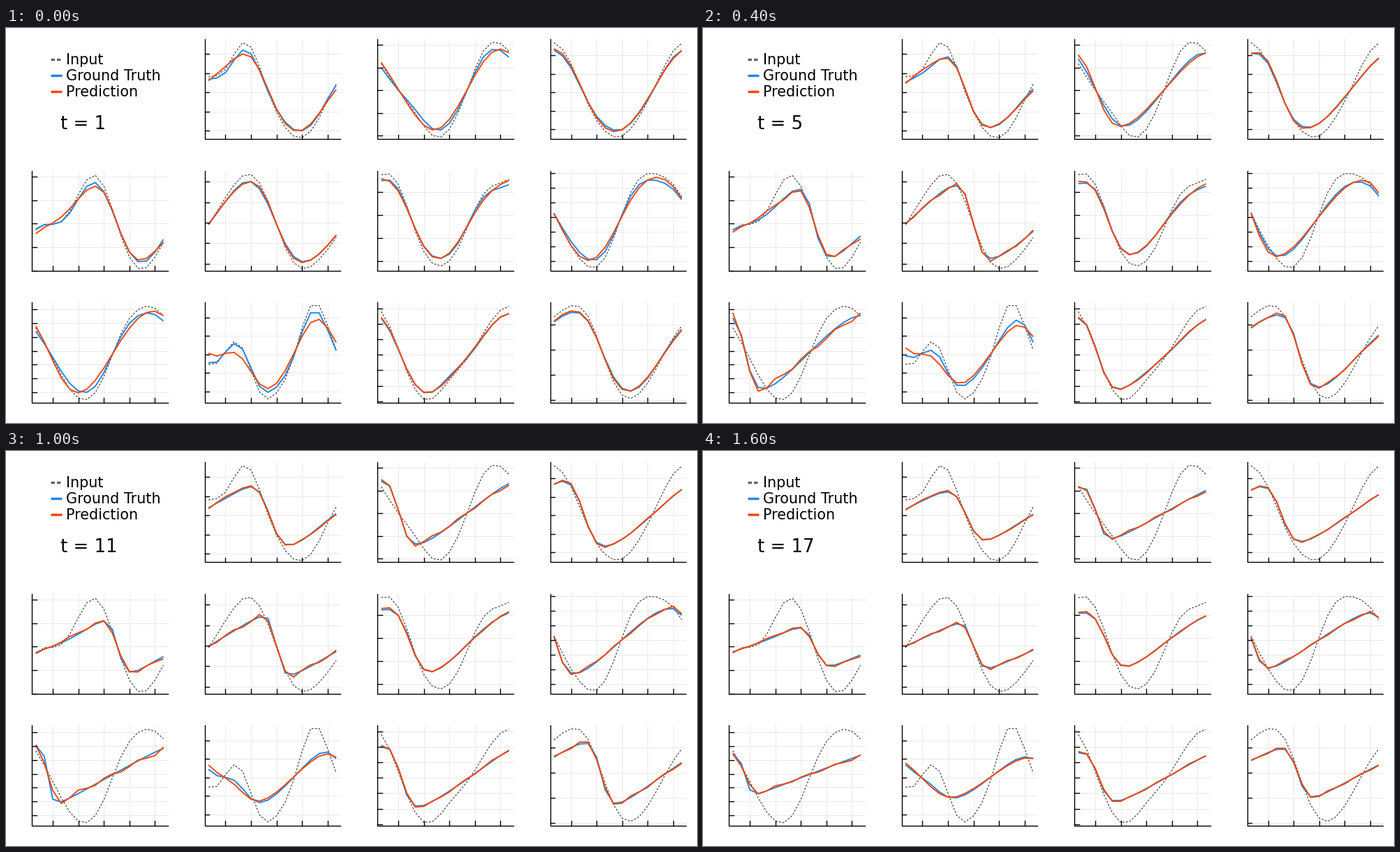
A matplotlib script that plays this animation: 990x566 px, repeating every 2.1 s.

```python
import numpy as np
import matplotlib.pyplot as plt
from matplotlib.animation import FuncAnimation

W, H, DPI = 990, 566, 100
PX = 72 / DPI                      # points per pixel
BLUE, ORANGE, GRAY = "#1c86ee", "#ff4500", "#4d4d4d"
LAST, HOLD = 17, 4                 # final time step, extra frames it stays

POINTS, FINE = 16, 64              # plotted samples, solver cells per period
SUBSTEPS = 20                      # solver steps per time step
SPEED = 0.105                      # samples per step travelled at value 1
VISCOSITY = 0.14
GAIN = 0.85                        # truth amplitude relative to the input
BLUR, MODES = 0.12, 4              # smoothing and bandwidth of the prediction

# Per panel: row, column, y of zero, pixels per tick, value per tick,
# and the input's height above zero at every second sample.
PANELS = [
    (0, 1, 92, 27.5, 1, [22, 33, 71, 36, -29, -63, -56, -11]),
    (0, 2, 89, 32.5, 2, [38, 0, -33, -65, -56, -3, 56, 67]),
    (0, 3, 92, 26.5, 1, [71, 41, -17, -56, -63, -35, 12, 59]),
    (1, 0, 280.4, 33.7, 2, [-9, -1, 18, 63, 54, -17, -64, -48]),
    (1, 1, 279, 29.4, 2, [-3, 36, 67, 57, -3, -57, -63, -38]),
    (1, 2, 268, 33.2, 1, [58, 44, -23, -69, -66, -21, 30, 46]),
    (1, 3, 271, 21, 1, [6, -41, -71, -58, 4, 55, 62, 47]),
    (2, 0, 462.5, 19.8, 2, [33, -11, -55, -70, -37, 24, 59, 61]),
    (2, 1, 467.7, 26.6, 1, [-14, 4, 9, -54, -55, -4, 70, 41]),
    (2, 2, 468.3, 22.1, 1, [62, 9, -50, -63, -36, -7, 31, 64]),
    (2, 3, 461, 36, 2, [47, 63, 48, -15, -65, -63, -27, 17]),
]

plt.rcParams["font.family"] = "DejaVu Sans"
fig = plt.figure(figsize=(W / DPI, H / DPI), dpi=DPI, facecolor="white")
ax = fig.add_axes([0, 0, 1, 1])
ax.set(xlim=(0, W), ylim=(H, 0))
ax.axis("off")


def stroke(x, y, color, width, z, **kw):
    return ax.plot(x, y, color=color, lw=width * PX, zorder=z, **kw)[0]


def label(x, y, text, size):
    return ax.text(x, y, text, size=size * PX, color="black", va="baseline")


def periodic(knots):
    """Band-limited periodic curve through evenly spaced knots."""
    c = np.fft.rfft(knots)
    c[-1] /= 2
    return np.fft.irfft(c, FINE) * FINE / len(knots)


def filtered(u, factor):
    """Scale each Fourier mode m of u by factor(m)."""
    c = np.fft.rfft(u)
    return np.fft.irfft(c * factor(np.arange(len(c))), FINE)


def burgers(u, steps):
    """States of the viscous Burgers equation after 0..steps time steps."""
    dx, dt = POINTS / FINE, 1 / SUBSTEPS
    states = [u]
    for _ in range(steps):
        for _ in range(SUBSTEPS):
            ahead, behind = np.roll(u, -1), np.roll(u, 1)
            advection = (ahead**2 - behind**2) / (4 * dx)
            diffusion = VISCOSITY * (ahead - 2 * u + behind) / dx**2
            u = u + dt * (diffusion - advection)
        states.append(u)
    return states


def axes_box(left, top, zero, step):
    right, bottom = left + 194.3, top + 143.3
    for x in left + 5.4 + 12.2 * np.arange(2, POINTS, 3):
        stroke([x, x], [top, bottom], "#e9e9e9", 1, 1)
        stroke([x, x], [bottom - 6.5, bottom], "black", 1.4, 5)
    for y in zero + step * np.arange(-3, 4):
        if top < y < bottom:
            stroke([left, right], [y, y], "#e9e9e9", 1, 1)
            stroke([left, left + 6.5], [y, y], "black", 1.4, 5)
    stroke([left, left, right], [top, bottom, bottom], "black", 1.4, 5)


def panel(row, col, zero, step, unit, knots):
    """Draw one panel; return its moving lines with their curves over time."""
    left, top = 37.2 + 247.5 * col, 16 + H / 3 * row
    axes_box(left, top, zero, step)
    x = left + 5.4 + 12.2 * np.arange(POINTS)
    scale = SPEED * unit / step    # pixels of height to wave speed

    def to_y(u):
        return zero - u[::FINE // POINTS] / scale

    start = scale * periodic(knots)
    stroke(x, to_y(start), GRAY, 1.3, 2, ls=(0, (2.1, 1.7)),
           dash_capstyle="butt")

    truth = burgers(GAIN * start, LAST - 1)
    blurred = filtered(start, lambda m: np.exp(-BLUR * m**2))
    pred = [filtered(u, lambda m: m <= MODES)
            for u in burgers(blurred, LAST)[1:]]
    return [(stroke(x, to_y(states[0]), color, 1.9, z, solid_capstyle="butt"),
             [to_y(u) for u in states])
            for states, color, z in ((truth, BLUE, 3), (pred, ORANGE, 4))]


moving = [pair for spec in PANELS for pair in panel(*spec)]

# Legend
for y, color, name, dash in ((44.5, "#666666", "Input", (0, (1.6, 0.9))),
                             (67.5, BLUE, "Ground Truth", "-"),
                             (90.5, ORANGE, "Prediction", "-")):
    stroke([64, 79.5], [y, y], color, 3.4, 3, ls=dash,
           solid_capstyle="butt", dash_capstyle="butt")
    label(86.3, y + 7.6, name, 20.8)

clock = label(78, 145, "t = 1", 26)


def update(i):
    t = min(i + 1, LAST)
    clock.set_text(f"t = {t}")
    for line, curves in moving:
        line.set_ydata(curves[t - 1])
    return [clock] + [line for line, _ in moving]


anim = FuncAnimation(fig, update, frames=LAST + HOLD, interval=100,
                     repeat=True, repeat_delay=0)
plt.show()
```
